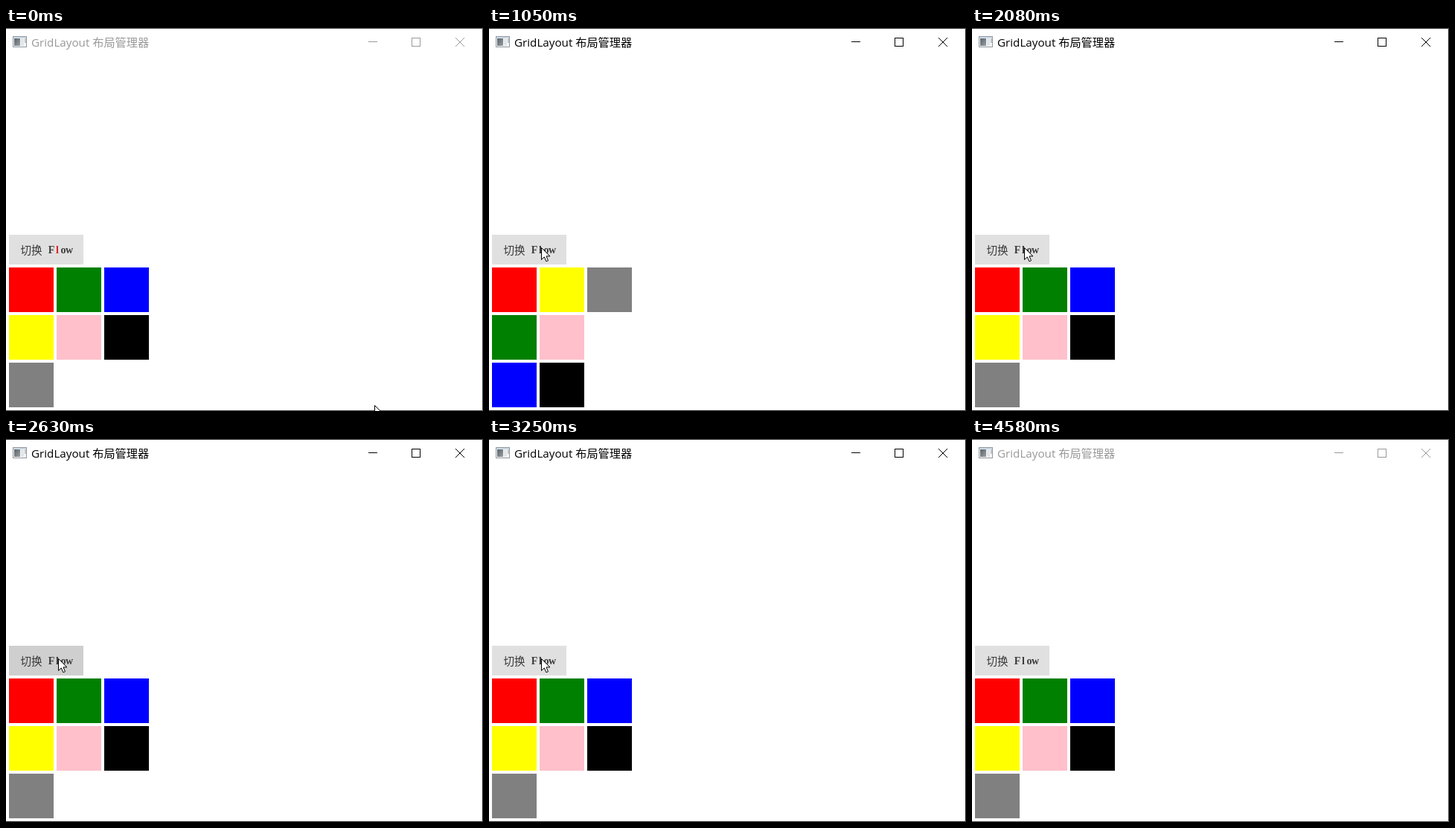
Recreate the animation shown at these times as an HTML page. Size 641x515 px, loop 4.68 s.

```html
<!DOCTYPE html>
<html lang="zh">
<head>
<meta charset="utf-8">
<style>
  html, body { margin: 0; width: 100%; height: 100%; overflow: hidden; background: #fff; }
  svg { display: block; }
  .title { font: 15.2px "Open Sans", "Noto Sans CJK SC", "Noto Sans CJK", sans-serif; }
  .han { font: 500 14.6px "Noto Sans CJK SC", "Noto Sans CJK", sans-serif; }
  .latin { font: bold 14px "Liberation Serif", serif; text-anchor: middle; }
</style>
</head>
<body>
<svg id="stage" width="641" height="515" viewBox="0 0 641 515">
  <defs>
    <linearGradient id="pane" x2="1" y2="1">
      <stop stop-color="#59636b"/>
      <stop offset="1" stop-color="#9a9fa2"/>
    </linearGradient>
  </defs>
  <rect width="641" height="515" fill="#fff"/>

  <g id="icon">
    <rect x="9.5" y="11.5" width="18" height="14" fill="#f4f6f8" stroke="#9299a0"/>
    <rect x="10" y="12" width="17" height="1.5" fill="#c3d3e2"/>
    <rect x="11" y="14" width="8" height="10" fill="url(#pane)"/>
    <rect x="20" y="14" width="4" height="10" fill="#e3e6e9"/>
    <path d="M26 14v6" stroke="#8b969e"/>
  </g>

  <text id="title" class="title" x="34" y="25">GridLayout 布局管理器</text>
  <g id="controls" fill="none">
    <path d="M487 18.5h12"/>
    <rect x="545.5" y="13.5" width="11" height="11"/>
    <path d="M604 13l12 12M616 13l-12 12"/>
  </g>

  <rect id="button" x="4" y="278" width="100" height="40"/>
  <g id="label" fill="#3a3a3c">
    <text class="han" x="19.5" y="303.5">切换</text>
  </g>
  <g id="tiles"></g>
  <path id="border" d="M0 .5H640.5V514.5H0" fill="none"/>
  <path id="cursor" d="M.5 .5V16.5L4.3 12.9 6.9 18.8 9.5 17.7 7 11.9H12Z" fill="#fff" stroke="#000"/>
</svg>
<script>
const LOOP = 4680;
const colors = ['red', 'green', 'blue', 'yellow', 'pink', 'black', 'gray'];
const presses = [[970, 1050], [1910, 2080], [2630, 2780], [3160, 3250]];
const home = [70, 295];

const $ = id => document.getElementById(id);
const set = (el, attrs) => {
  for (const key in attrs) el.setAttribute(key, attrs[key]);
  return el;
};
const add = (parent, tag, attrs) =>
  parent.appendChild(set(document.createElementNS('http://www.w3.org/2000/svg', tag), attrs));

const tiles = colors.map(fill => add($('tiles'), 'rect', { width: 60, height: 60, fill }));
const letters = [...'Flow'].map((char, i) => {
  const text = add($('label'), 'text', { class: 'latin', x: 61 + i * 8, y: 303 });
  text.textContent = char;
  return text;
});

// Number of position updates done by time t, spread evenly from first to last.
const stepsDone = (t, first, last, count) =>
  t < first ? 0 : Math.min(count, Math.floor((t - first) * (count - 1) / (last - first)) + 1);

const mix = (a, b, p) => a.map((v, i) => Math.round(v + (b[i] - v) * p));

function pointer(t) {
  if (t < 3890) {
    const p = stepsDone(t, 70, 510, 7) / 7;
    return mix([495, 507], home, 1 - (1 - p) ** 1.6);
  }
  const k = stepsDone(t, 3890, 4270, 6);
  const p = k / 5;
  return k > 5 ? null : mix(home, [522, 503], p * p * (3 - 2 * p));
}

function draw(t) {
  const active = t >= 970 && t < 4580;
  const pressed = presses.some(([down, up]) => t >= down && t < up);
  const byColumn = presses.filter(([, up]) => t >= up).length % 2 === 1;

  set($('title'), { fill: active ? '#000' : '#999' });
  set($('controls'), { stroke: active ? '#000' : '#999' });
  set($('border'), { stroke: active ? '#222' : '#444' });
  set($('button'), { fill: pressed ? '#cfcfcf' : '#e0e0e0' });
  set(letters[1], { fill: t < 970 ? '#e02020' : '#3a3a3c' });

  tiles.forEach((tile, i) => {
    const minor = i % 3, major = Math.floor(i / 3);
    const [col, row] = byColumn ? [major, minor] : [minor, major];
    set(tile, { x: 4 + col * 64, y: 322 + row * 64 });
  });

  const at = pointer(t);
  set($('cursor'), at
    ? { visibility: 'visible', transform: `translate(${at})` }
    : { visibility: 'hidden' });
}

const start = performance.now();
function tick() {
  draw((performance.now() - start) % LOOP);
  requestAnimationFrame(tick);
}
tick();
</script>
</body>
</html>
```
